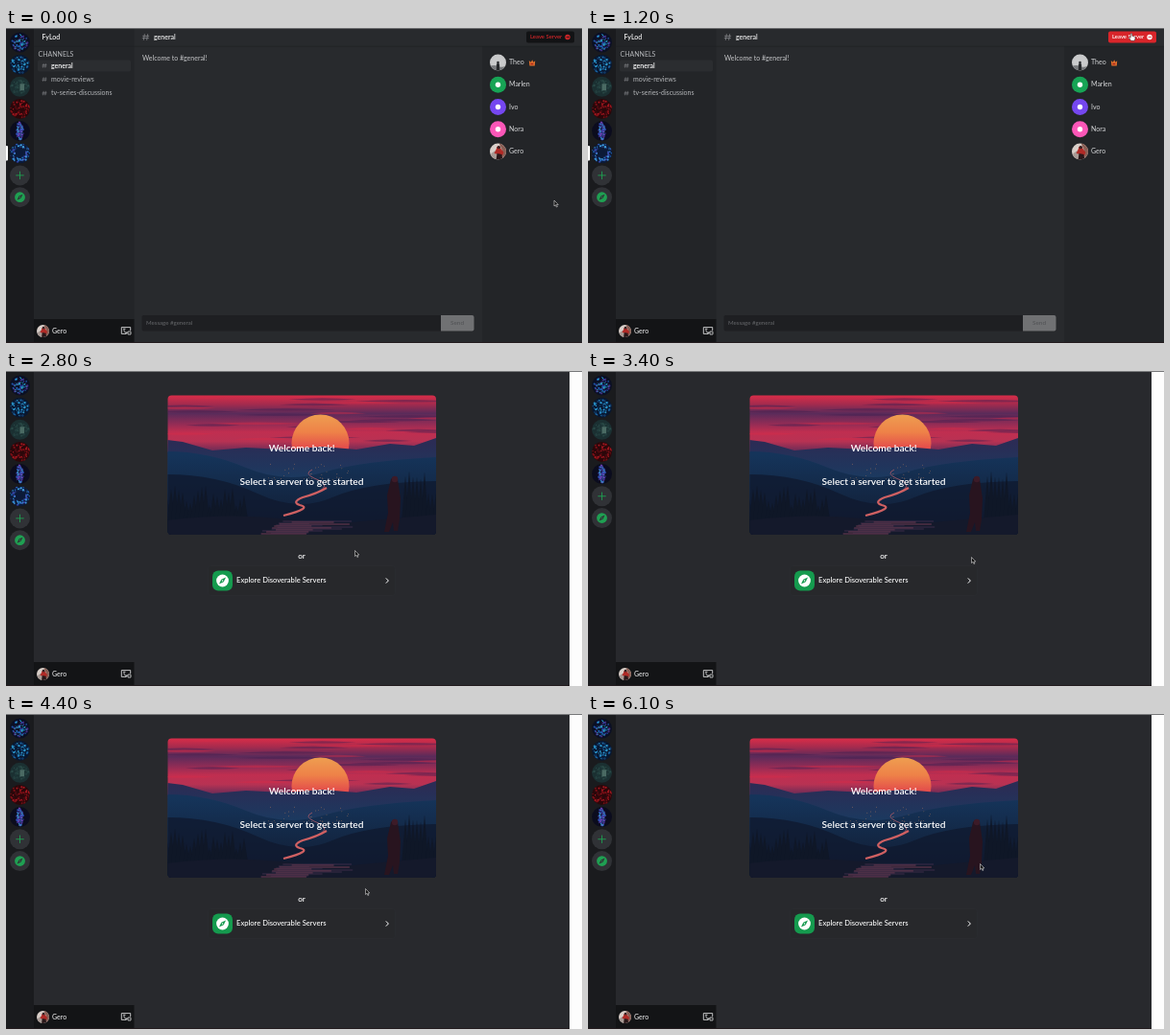
Recreate the animation shown at these times as an HTML page with a canvas. Size 600 px wide and 329 px high, loop 6200 ms.

```html
<!DOCTYPE html>
<html lang="en">
<head>
<meta charset="utf-8">
<title>Leaving a chat server</title>
<style>
html, body { margin: 0; width: 100%; height: 100%; overflow: hidden; background: #28292d; }
canvas { display: block; width: 600px; height: 329px; }
</style>
</head>
<body>
<canvas id="stage"></canvas>
<script>
const LOOP = 6200, STEP = 100;
const HOVER = 700, MODAL_IN = 1200, MODAL_OUT = 2300, HOME = 2500, REMOVED = 3000;
const SERVER = 'FyLod', USER = 'Gero';

const canvas = document.getElementById('stage');
const ratio = window.devicePixelRatio || 1;
canvas.width = 600 * ratio;
canvas.height = 329 * ratio;
const c = canvas.getContext('2d');
c.scale(ratio, ratio);

const clamp = v => Math.max(0, Math.min(1, v));
const random = n => { const s = Math.sin(n * 127.1 + 3.7) * 43758.5453; return s - Math.floor(s); };

function rect(x, y, w, h, fill, radius = 0, stroke) {
  c.beginPath();
  c.roundRect(x, y, w, h, radius);
  if (fill) { c.fillStyle = fill; c.fill(); }
  if (stroke) { c.strokeStyle = stroke; c.lineWidth = 0.7; c.stroke(); }
}

function circle(x, y, r, fill) {
  c.beginPath();
  c.arc(x, y, r, 0, 7);
  c.fillStyle = fill;
  c.fill();
}

function shape(path, fill, stroke, width = 1) {
  const p = new Path2D(path);
  if (fill) { c.fillStyle = fill; c.fill(p); }
  if (stroke) { c.strokeStyle = stroke; c.lineWidth = width; c.stroke(p); }
}

function at(x, y, draw, scale = 1) {
  c.save();
  c.translate(x, y);
  c.scale(scale, scale);
  draw();
  c.restore();
}

function inCircle(x, y, r, draw) {
  at(x, y, () => {
    c.beginPath();
    c.arc(0, 0, r, 0, 7);
    c.clip();
    draw();
  });
}

// y is the vertical middle of the lowercase letters
function text(str, x, y, color = '#d6d7d9', size = 7, weight = 400, align = 'left') {
  c.font = `${weight} ${size}px Lato, "Open Sans", sans-serif`;
  c.textAlign = align;
  c.fillStyle = color;
  c.fillText(str, x, y + size * 0.32);
}

function hash(x, y, scale, color = '#85878b') {
  at(x, y, () => shape('M-1-3L-2 3M2-3L1 3M-3-1H3.3M-3.3 1H3', null, color, 0.7), scale);
}

function compass(x, y, r, disc, needle) {
  circle(x, y, r, disc);
  at(x, y, () => {
    shape('M.55-.55L.2.2L-.55.55L-.2-.2Z', needle);
    circle(0, 0, 0.12, disc);
  }, r);
}

const servers = [
  { base: '#0b1024', colors: ['#1d5fb0', '#27a9c4', '#2b3590', '#4a2f86'], spread: [8, 9] },
  { base: '#081730', colors: ['#1a639e', '#2a97cc', '#123a68'], spread: [10, 9] },
  { base: '#1b3032', colors: ['#233f3f', '#1c3536', '#2a4a47'], spread: [10, 7] },
  { base: '#2a070a', colors: ['#7c0f16', '#4c0a10', '#a5171f'], spread: [10, 10] },
  { base: '#0b0c1e', colors: ['#2f4cb4', '#7440b4', '#2b2a78', '#3791cc'], spread: [3.5, 10] },
  { base: '#0c1a38', colors: ['#2166b8', '#3f9cdc', '#3d45ac', '#12305e'], ring: 8 }
];

function serverIcon({ base, colors, spread, ring }, y, seed) {
  inCircle(14.5, y, 10.5, () => {
    rect(-11, -11, 22, 22, base);
    for (let i = 0; i < 70; i++) {
      const n = seed * 200 + i * 3, angle = i * 2.4;
      const reach = ring ? ring + random(n) * 5 - 2.5 : Math.sqrt(random(n));
      const [w, h] = ring ? [1, 1] : spread;
      circle(Math.cos(angle) * reach * w, Math.sin(angle) * reach * h,
        0.4 + random(n + 1) * 0.8, colors[i % colors.length]);
    }
    if (seed === 2) rect(0, -3, 4.5, 7, '#4a6a63');
  });
}

function avatar(x, y, r) {
  inCircle(x, y, r, () => {
    c.scale(r / 8.5, r / 8.5);
    rect(-9, -9, 18, 18, '#d9cfc9');
    shape('M1-9H9V9H5L4-2Z', '#8a5f55');
    shape('M-7 2L-3-1L0 3L-2 9H-8Z', '#a89a95');
    shape('M-1-5Q2-7 3-3L6 1L4 5L1 3L-4 2L-2-2Z', '#b02a26');
    shape('M-1 2L4 3L5 9H-2Z', '#2a1719');
    circle(0.8, -4.4, 1.7, '#392022');
  });
}

function rail(t) {
  rect(0, 0, 29, 329, '#1a1b1e');
  const count = t < REMOVED ? 6 : 5;
  for (let i = 0; i < count; i++) serverIcon(servers[i], 15 + i * 23.15, i);
  const y = 15 + count * 23.15;
  circle(14.5, y, 10.5, '#303236');
  shape(`M10.3 ${y}H18.7M14.5 ${y - 4.2}V${y + 4.2}`, null, '#1fa052', 0.9);
  circle(14.5, y + 22.8, 10.5, '#303236');
  compass(14.5, y + 22.8, 5.4, '#1fa052', '#303236');
}

function userPanel() {
  rect(29, 304, 104.5, 25, '#131416');
  avatar(38.5, 316.5, 6.5);
  text(USER, 48, 316.5, '#e4e4e5', 7, 500);
  at(125, 316, () => {
    shape('M0 3.4H-4.7V-3.4H4.7V0', null, '#d6d7d9', 0.9);
    shape('M-3-1.8H-.5M-2-1.8V.8L1 3M1 1V3H-1M2 1H5V4H2Z', null, '#d6d7d9', 0.8);
  });
}

function leaveButton(hover) {
  const color = hover ? '#fff' : '#cf2528';
  rect(542, 3.5, 50, 12, hover ? '#d9252a' : '#121315', 2);
  text('Leave Server', 546, 9.5, color, 5.9, 600);
  circle(585, 9.5, 2.7, color);
  shape('M583.5 9.5H586.3M585.3 8.4L586.4 9.5L585.3 10.6', null, hover ? '#d9252a' : '#121315', 0.6);
}

function members() {
  inCircle(512.5, 36, 8.5, () => {
    rect(-9, -9, 18, 18, '#c9cacb');
    shape('M-9 4Q-4 2 0 4T9 3V9H-9Z', '#77797c');
    shape('M-1.6 9V2Q0-1 1.6 2V9Z', '#26282b');
    circle(0, 0, 1.3, '#26282b');
  });
  text('Theo', 524, 36);
  at(548, 36.5, () => {
    shape('M-3.2-2.6L-1.2-.8L.2-3.2L1.4-.8L3.2-2.2L2.8 3H-2.6Z', '#e0702b');
    rect(-1.6, 0.3, 3, 1.5, '#a9231f');
  });
  [['Marlen', '#17a455'], ['Ivo', '#7547f0'], ['Nora', '#fb57b8']].forEach(([name, color], i) => {
    const y = 59.2 + i * 23.3;
    circle(512.5, y, 8.5, color);
    circle(512.5, y, 2.7, '#fff');
    text(name, 524, y);
  });
  avatar(512.5, 129, 8.5);
  text(USER, 524, 129);
}

function chat(t) {
  rect(29, 0, 571, 329, '#282a2d');
  rect(29, 0, 104.5, 329, '#232528');
  rect(496, 19, 104, 310, '#232528');
  rect(29, 18.7, 571, 0.8, '#1f2023');
  rail(t);
  rect(0, 123, 2, 15.5, '#fff', [0, 1, 1, 0]);
  text(SERVER, 37.5, 9.5, '#f2f2f2', 7, 600);
  text('CHANNELS', 33.5, 27.8, '#b4b6b9');
  rect(33, 33.5, 97, 12, '#2b2d30', 2);
  ['general', 'movie-reviews', 'tv-series-discussions'].forEach((name, i) => {
    const y = 39.3 + i * 14.4;
    hash(40, y, 0.75);
    text(name, 47, y, i ? '#b4b6b9' : '#fff', 7, i ? 400 : 600);
  });
  hash(145.5, 9.5, 1.1);
  text('general', 154, 9.5, '#f2f2f2', 7, 600);
  text('Welcome to #general!', 142, 31.8, '#c6c7c9');
  rect(141.5, 300, 312, 16.5, '#1e1f22', [2, 0, 0, 2]);
  text('Message #general', 146, 308.3, '#66686b', 6.1);
  rect(453, 300, 34.5, 16.5, '#707173', [0, 2, 2, 0]);
  text('Send', 470, 308.3, '#4f5153', 6.4, 400, 'center');
  members();
  userPanel();
  leaveButton(t >= HOVER && t < MODAL_IN + 100);
}

function modal(alpha) {
  c.globalAlpha = alpha;
  rect(0, 0, 600, 329, 'rgba(0,0,0,.7)');
  rect(210.5, 123, 179.5, 83.5, '#303237', 3);
  rect(210.5, 178, 179.5, 28.5, '#292b2f', [0, 0, 3, 3]);
  text(`Leave ${SERVER}`, 217, 135, '#fff', 8.5, 600);
  text(`Are you sure you want to leave ${SERVER}?`, 300, 158, '#f0f0f1', 7, 400, 'center');
  text('Cancel', 310, 192, '#f0f0f1');
  rect(338, 184, 45.5, 16, '#a5181e', 2);
  text('Leave Server', 361, 192, '#fff', 5.7, 700, 'center');
  c.globalAlpha = 1;
}

function gradient(y0, y1, ...colors) {
  const g = c.createLinearGradient(0, y0, 0, y1);
  colors.forEach((color, i) => g.addColorStop(i / (colors.length - 1), color));
  return g;
}

function trees(from, to, base, height, seed) {
  for (let x = from, i = 0; x < to; x += 4, i++) {
    const top = base - height * (0.4 + 0.6 * random(seed + i));
    shape(`M${x} ${top}L${x + 4} ${base}V172H${x - 4}V${base}Z`, '#0f1727');
  }
}

function banner() {
  c.save();
  c.beginPath();
  c.roundRect(168.5, 25.5, 279.5, 145.5, 4);
  c.clip();
  rect(168, 25, 281, 60, gradient(25, 83, '#dc2d48', '#a42b4e', '#5a2b5a', '#8c2c56', '#c02e50', '#b83253', '#702c56'));
  for (let i = 0; i < 26; i++) {
    const x = 150 + random(i) * 270, y = 28 + i * 1.8, w = 40 + random(i + 50) * 70;
    shape(`M${x} ${y}q${w / 2}-3 ${w} 0q${-w / 2} 2 ${-w} 0Z`, i % 3 ? 'rgba(66,33,80,.45)' : 'rgba(214,44,72,.45)');
  }
  circle(327.5, 75.5, 30, gradient(46, 82, '#ee9d50', '#ee8148', '#e2484c'));
  shape('M168 72L184 74L215 83L250 80L290 82L330 79L365 82L400 76L425 78L448 70V172H168Z',
    gradient(75, 150, '#2b2c55', '#1b3a60', '#14294a'));
  shape('M168 84Q210 84 250 101T330 106T448 90V172H168Z', gradient(88, 171, '#15345a', '#132744', '#121a2f'));
  shape('M168 108Q220 108 262 128T340 132T448 115V172H168Z', 'rgba(15,25,46,.75)');
  for (let i = 0; i < 40; i++) {
    circle(270 + random(i + 300) * 90, 96 + random(i + 400) * 20, 0.45, '#a8765c');
  }
  shape('M319 103Q310 107 321 112Q340 119 325 126', null, '#8f5365', 1);
  shape('M334 122Q324 128 309 132Q297 137 306 140Q320 143 289 151', null, '#cf6062', 2.2);
  trees(168, 252, 155, 36, 10);
  trees(416, 452, 158, 56, 60);
  shape('M168 156Q230 148 285 154T360 158T448 150V172H168Z', '#14192b');
  for (let i = 0; i < 14; i++) {
    const y = 157 + i;
    shape(`M${300 - i * 2 - random(i + 90) * 14} ${y}h${30 + random(i + 70) * 55}`, null, i % 2 ? '#7a3f55' : '#3f2d4a', 0.9);
  }
  shape('M401 113Q404 108 408 113L411 133L410 155L408 167H404L403 158L399 168H394L398 148L397 130Z', '#28141f');
  circle(405, 113, 3.2, '#3c1b28');
  c.restore();
  text('Welcome back!', 308.2, 81, '#fff', 10.2, 600, 'center');
  text('Select a server to get started', 308, 115.7, '#fff', 10.2, 600, 'center');
}

function home(t) {
  rect(29, 0, 558, 329, '#28292d');
  rect(587, 0, 13, 329, '#fdfdfd');
  rail(t);
  userPanel();
  banner();
  text('or', 308, 193.5, '#fff', 8, 600, 'center');
  rect(210.5, 203.5, 195, 31, '#27282b', 3, '#2c2d31');
  rect(215, 208.5, 21, 21, '#159a4e', 6);
  compass(225.5, 219, 6.4, '#fff', '#159a4e');
  text('Explore Disoverable Servers', 240, 219, '#fff', 7.6, 500);
  shape('M395.8 216.4L398.4 219L395.8 221.6', null, '#fff', 1);
}

// time, x, y of the pointer tip
const path = [
  [0, 571, 180], [100, 571, 180], [700, 566, 6], [1350, 566, 6], [1950, 365, 185],
  [2300, 365, 185], [2800, 363.5, 187.5], [3000, 363.5, 187.5], [3400, 399.5, 194.5],
  [3800, 508, 212], [4400, 374.5, 182.5], [4900, 374.5, 182.5], [5900, 408.5, 156.5], [LOOP, 408.5, 156.5]
];

function pointer(t) {
  const i = path.findIndex(key => key[0] > t);
  const [t0, x0, y0] = path[i - 1], [t1, x1, y1] = path[i];
  const u = (t - t0) / (t1 - t0), k = u * u * (3 - 2 * u);
  const overButton = (t >= HOVER && t < MODAL_IN + 100) || (t >= 1900 && t < HOME);
  at(x0 + (x1 - x0) * k, y0 + (y1 - y0) * k, () => {
    if (overButton) {
      shape('M-.8 0Q0-1 .8 0V2.4L3.5 3.2Q4.3 3.5 4 5L3.3 7.3H-.3L-2.4 4.5Q-2.4 3.5-.8 4.3Z', '#fff', '#222', 0.5);
    } else {
      shape('M0 0V6L1.4 4.8L2.4 7L3.4 6.6L2.4 4.5H4.3Z', '#111', '#d8d8d8', 0.6);
    }
  });
}

function draw(now) {
  const t = Math.floor(now % LOOP / STEP) * STEP;
  if (t < HOME) {
    chat(t);
    const alpha = Math.min(clamp((t - MODAL_IN) / 200), clamp((HOME - t) / (HOME - MODAL_OUT)));
    rect(0, 0, 600, 1, '#68696b');
    if (alpha > 0) modal(alpha);
  } else {
    home(t);
    rect(0, 0, 600, 1, '#77787a');
  }
  rect(0, 328, t < HOME ? 600 : 587, 1, '#221a1d');
  pointer(t);
}

let start;
function tick(now) {
  start ??= now;
  draw(now - start);
  requestAnimationFrame(tick);
}
requestAnimationFrame(tick);
</script>
</body>
</html>
```
